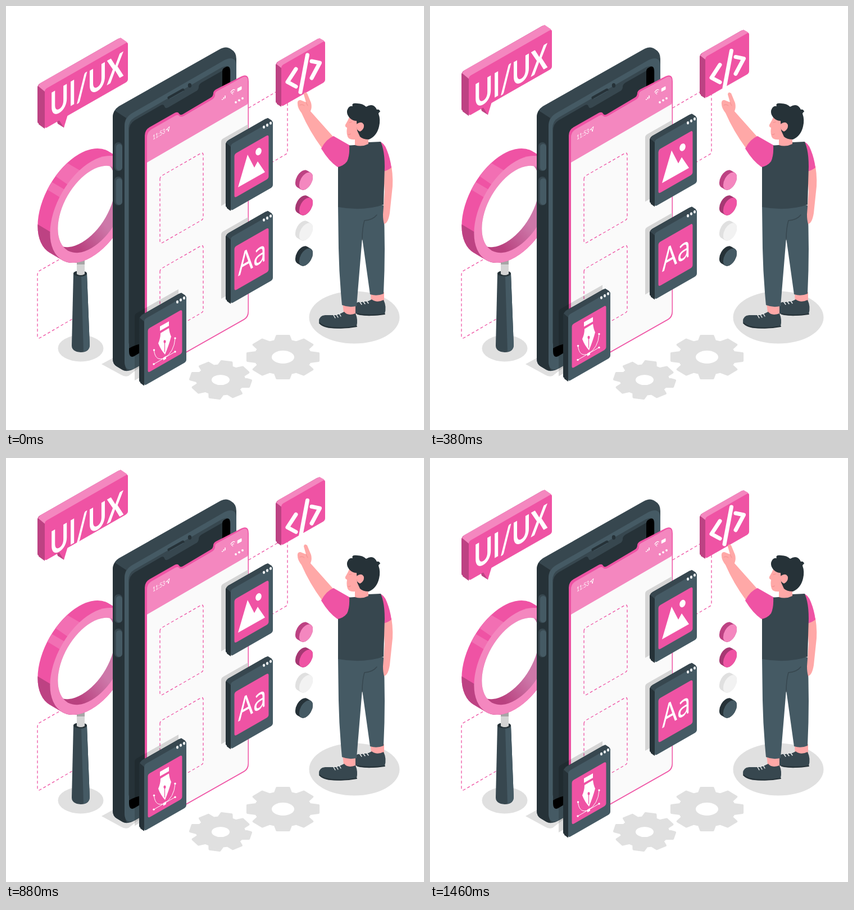
An HTML page that plays this animation: 744x753 px, repeating every 1500 ms.

```html
<!DOCTYPE html>
<html lang="en">
<head>
<meta charset="utf-8">
<title>App design</title>
<style>
  html, body { margin: 0; width: 100%; height: 100%; overflow: hidden; background: #fff; }
  svg { display: block; width: 744px; height: 753px; }
  .dash { fill: none; stroke: #ef53a4; stroke-width: 1.3; stroke-dasharray: 5 4; }
  .line { fill: none; stroke: #fff; stroke-linecap: round; stroke-linejoin: round; }
  .p { fill: #ef53a4; } .pl { fill: #f487bf; } .pd { fill: #bd4283; }
  .d1 { fill: #263238; } .d2 { fill: #37474f; } .d3 { fill: #455a64; }
  .g { fill: #e0e0e0; } .w { fill: #fff; } .skin { fill: #ffa8a7; }
  text { fill: #fff; }
</style>
</head>
<body>
<svg viewBox="0 0 744 753">
  <defs>
    <linearGradient id="wall" x1="0" y1="1" x2="1" y2="0">
      <stop offset=".2" stop-color="#b9417f"/><stop offset=".5" stop-color="#cd78a9"/>
    </linearGradient>
    <clipPath id="hole"><circle r="69" transform="matrix(.866 -.5 0 1 152 361)"/></clipPath>
    <clipPath id="rim"></clipPath>
    <clipPath id="onSheet"><path d="M248 100H431V700H248Z"/></clipPath>
    <g id="card"></g>
    <path id="cardShade" d="M383 241Q383 237 387 235L461 193V310L383 355Z"/>
  </defs>

  <g id="floor" class="g">
    <ellipse cx="620" cy="553" rx="80.500" ry="46.500"/>
    <ellipse cx="133" cy="608" rx="40.500" ry="23.500"/>
    <path d="M170 636L192 624L240 640L218 657Q211 659 205 655Z"/>
  </g>

  <!-- guides -->
  <path class="dash" d="M102 446L60 470Q56 473 56 477V586Q56 592 61 589L118 556"/>
  <path class="dash" d="M432 181L497 143Q501 141 501 146V257Q501 262 497 264L440 297"/>

  <!-- magnifier -->
  <g>
    <path class="d2" d="M120 475Q132 467 144 475L149 603Q148 615 133 615Q117 614 117 603Z"/>
    <path class="d3" d="M134 481Q143 480 144 475L149 603Q148 613 138 614Z"/>
    <ellipse class="d1" cx="132" cy="475" rx="12" ry="5"/>
    <path fill="#a6a6a6" d="M126 452H140V476Q133 480 126 476Z"/>
    <path fill="#d4d4d4" d="M126 459H140V476Q133 480 126 476Z"/>
    <g clip-path="url(#rim)">
      <path class="p" d="M50 245H230V460H50Z"/>
      <path class="pd" d="M50 384L82 403L140 470H50Z"/>
      <path fill="#f26fb3" d="M85 300L104 276L135 294L114 320ZM70 324L77 310L106 327L98 341Z"/>
    </g>
    <circle class="pl" r="85" transform="matrix(.866 -.5 0 1 152 361)"/>
    <g clip-path="url(#hole)">
      <path fill="url(#wall)" d="M88 275H220V445H88Z"/>
      <circle class="w" r="69" transform="matrix(.866 -.5 0 1 135 351)"/>
    </g>
  </g>

  <!-- phone -->
  <path class="d2" d="M190 626V198Q190 185 201 178L380 77Q392 70 401 77Q410 82 410 94V540L232 642Q216 652 207 646L197 640Q190 636 190 626Z"/>
  <path class="d1" d="M190 626V198Q190 191 194 186L214 199Q211 205 211 213V630Q211 640 215 647Q211 648 207 646L197 640Q190 636 190 626Z"/>
  <path class="d3" d="M211 630V214Q211 198 225 190L389 96Q410 86 410 108V540L232 642Q211 653 211 630Z"/>
  <path class="d2" d="M218 600V218Q218 204 229 198L384 109Q400 101 400 118V300Z"/>
  <path fill="#000" d="M219 613V560H300V578L228 622Q219 626 219 613ZM385 180V116Q385 111 390 109Q399 104 399 116V180Z"/>
  <path class="d1" d="M219 606V222Q219 209 229 203L276 176Q281 174 282 178Q283 183 289 180L337 152Q343 149 343 144Q343 139 348 136L385 115V300L260 594L232 602Q226 604 219 608Z"/>
  <g class="line">
    <path stroke="#263238" stroke-width="5" d="M290 163L315 149"/>
    <path stroke="#455a64" stroke-width="1" d="M291 165L316 151"/>
  </g>
  <ellipse class="d1" cx="327" cy="141" rx="3.200" ry="4"/>
  <g id="keys"></g>

  <!-- screen sheet -->
  <path class="p" d="M247 640V230Q247 220 256 215L300 190Q306 187 308 191Q310 195 315 192L364 163Q369 160 369 155Q369 151 374 148L419 125Q432 119 432 134V543Q432 553 424 557.500L262 649Z"/>
  <path fill="#fafafa" d="M251 640V276L430.500 172V543Q430 552 423 556L262 647Z"/>
  <path class="pl" d="M251 278V233Q251 224 259 219L301 195Q306 192 308 195Q311 198 317 195L367 166Q372 163 372 157Q372 153 376 151L420 127Q430.500 122 430.500 134V174Z"/>
  <text transform="matrix(.75 -.43 0 1 261 238)" font-family="Lato, sans-serif" font-size="11.500">11:53</text>
  <path class="line" stroke-width="1" d="M285 220L291 214L289 223L288 219Z"/>
  <g class="line">
    <path stroke-width="1.500" stroke-linecap="butt" d="M385 167V165M387.500 165.500V162M390 164V159"/>
    <path stroke-width="1.300" d="M400 153Q404 147 407 149M401.500 155Q404 152 405.500 152.500M403.500 156.500V156"/>
    <path stroke-width="1" fill="#fff" d="M412.500 146.500L419 143V148L412.500 151.500Z"/>
  </g>
  <g class="w"><circle cx="409" cy="171" r="1.900"/><circle cx="415" cy="167.500" r="1.900"/><circle cx="421" cy="164" r="1.900"/></g>
  <path id="slot" class="dash" d="M274 308Q274 303 278 301L346 262Q351 259 351 265V375Q351 379 347 381L279 420Q274 423 274 417Z"/>
  <use href="#slot" y="164.500"/>

  <!-- tool cards -->
  <g data-lift="1">
    <g fill="#d5d5d5" clip-path="url(#onSheet)">
      <use href="#cardShade"/><use href="#cardShade" y="165"/>
    </g>
    <use href="#cardShade" x="-154" y="310" fill-opacity=".15"/>
    <use href="#card"/>
    <path class="w" d="M413 322L430 264L442 287L448 276L461 295Z"/>
    <ellipse class="w" cx="449.500" cy="258.500" rx="5" ry="7" transform="rotate(20 449.500 258.500)"/>
    <use href="#card" y="165"/>
    <text transform="matrix(.78 -.45 0 1 413 480)" font-family="'Noto Sans', sans-serif" font-size="54">Aa</text>
    <use href="#card" x="-154" y="310.500"/>
    <path class="w" d="M274 569L290 560V568L274 577ZM275 581L290 572Q291 581 294 587Q290 602 283 619Q275 610 271 599Q275 590 275 581Z"/>
    <path class="line" style="stroke:#ef53a4" stroke-width="1.200" d="M282.500 614V597"/>
    <ellipse class="p" cx="282.500" cy="596" rx="2" ry="2.800"/>
    <path class="line" stroke-width="1" d="M263 636L301 614M263.500 612Q266 632 282 625Q299 615 301 591"/>
    <g class="w"><circle cx="263.500" cy="611" r="1.700"/><circle cx="301" cy="590" r="1.700"/><circle cx="263" cy="636" r="1.700"/><circle cx="301" cy="614" r="1.700"/><path d="M280 624.500L285 621.500V626.500L280 629.500Z"/></g>
  </g>

  <!-- label -->
  <g data-lift="3" id="bubble"></g>
  <text data-lift="2" data-at="matrix(.75 -.43 0 1 78 199)" font-family="Lato, sans-serif" font-weight="700" font-size="60">UI/UX</text>

  <!-- code block -->
  <g data-lift="2" id="code"></g>
  <g data-lift="1">
    <path class="line" stroke-width="7" stroke-linecap="butt" d="M516 112L501 135L516 143M536.500 87L524 153M544 98L558.500 101L544 128"/>
  </g>

  <g id="discs"></g>

  <!-- person -->
  <g>
    <path class="skin" d="M599 528H623V552L602 552ZM649 508H673V530L650 530Z"/>
    <path class="d2" d="M557 560Q557 550 568 549L587 549Q595 547 602 543Q608 551 622 546Q627 557 624 569Q600 574 577 572Q557 569 557 560Z"/>
    <path class="d2" d="M622 530Q624 525 632 526L645 524L651 521Q660 528 672 522Q678 534 674 547Q652 552 630 549L622 546Z"/>
    <path class="line" style="stroke:#263238" stroke-width="2" d="M558 563Q565 570 580 571Q604 573 624 569M626 547Q650 551 674 547"/>
    <path class="line" stroke-width="1.300" d="M583 549L586 554M588 548L591 553M593 546L596 551M630 526L633 530M636 525L639 529M642 524L645 528"/>
    <path class="d3" d="M591 354H672Q676 430 672 511Q660 516 648 512L634 412L624 533Q610 536 598 531Q593 480 592 430Z"/>
    <path class="line" style="stroke:#37474f" stroke-width="1.500" d="M634 415Q634 395 638 381Q653 380 660 371"/>
    <path class="skin" d="M671 285L686 284Q690 310 687 330L683 368Q680 386 673 387Q671 380 671 370L674 330Z"/>
    <path class="p" d="M664 241Q673 242 678 256Q684 271 686 287Q680 292 671 294Z"/>
    <path class="d2" d="M606 247Q621 249 645 242L667 241Q674 257 674 285L672 353Q635 365 591 357V278Z"/>
    <path class="skin" d="M562 252Q540 222 526 190Q519 181 519 174Q518 167 524 167L534 171L530 157Q531 151 536 155L543 172Q545 180 542 187L584 234Z"/>
    <path class="line" style="stroke:#f28f8f" stroke-width="1" d="M523 176Q528 174 531 177M534 171L537 177"/>
    <path class="p" d="M583 231Q597 239 611 247Q612 266 607 276Q601 284 590 286Q574 275 561 253Q570 236 583 231Z"/>
    <path class="skin" d="M613 193Q609 203 604 211Q603 215 607 216Q605 229 610 235Q615 238 621 237V247Q633 251 645 245V202Z"/>
    <path class="line" style="stroke:#f28f8f" stroke-width="1.200" d="M609 228Q612 229 613 227M611 207L615 206"/>
    <path class="d1" d="M612 199Q603 189 610 180Q613 177 617 178Q614 172 625 173Q635 173 641 179Q654 171 660 184Q665 183 666 188Q664 188 663 191Q667 202 664 214Q660 231 646 237Q635 237 630 232L625 221L624 204Q617 204 612 199Z"/>
    <path class="skin" d="M624 210Q633 203 637 211Q638 219 630 223Q623 221 624 210Z"/>
  </g>
</svg>
<script>
  const $ = id => document.getElementById(id);
  const SLOPE = 0.57;
  const poly = (pts, cls) => `<path class="${cls}" d="M${pts.map(p => p.join(' ')).join('L')}Z"/>`;

  // Sheared panel with softly rounded corners
  function panel(x, y, w, h, cls, r = 4) {
    const k = w * SLOPE, q = r * SLOPE;
    return `<path class="${cls}" d="M${x} ${y + r}Q${x} ${y} ${x + r} ${y - q}L${x + w - r} ${y - k + q}` +
      `Q${x + w} ${y - k} ${x + w} ${y - k + r}V${y - k + h - r}Q${x + w} ${y - k + h} ${x + w - r} ${y - k + h + q}` +
      `L${x + r} ${y + h - q}Q${x} ${y + h} ${x} ${y + h - r}Z"/>`;
  }

  function slab(x, y, w, h, dx, dy, [front, side, top]) {
    const k = w * SLOPE;
    return panel(x - dx, y - dy, w, h, side, 5) +
      poly([[x - dx, y - dy + 3], [x, y], [x, y + h], [x - dx + 2, y + h - dy]], side) +
      poly([[x - dx + 1, y - dy + 2], [x - dx + 5, y - dy - 3], [x - dx + w - 5, y - dy - k + 3],
        [x - dx + w, y - dy - k + .5], [x + w - 2, y - k], [x + w, y - k + 5], [x, y + 4]], top) +
      panel(x, y, w, h, front);
  }

  const pinks = ['p', 'pd', 'pl'];
  const dot = (x, y) => `<ellipse class="w" cx="${x}" cy="${y}" rx="2" ry="2.700"/>`;
  $('card').innerHTML = slab(400, 246, 75, 118, 9, 5, ['d3', 'd1', 'd2']) +
    panel(406.5, 263, 61, 78, 'p') + dot(459, 215) + dot(465, 211.5) + dot(471, 208);
  $('bubble').innerHTML = poly([[90, 202], [92, 209], [103, 216], [105, 195]], 'pd') +
    slab(69, 148, 148, 70, 13, 8, pinks) + poly([[94, 202], [103, 216], [110, 193]], 'p');
  $('code').innerHTML = slab(490, 106, 78, 73, 10, 5, pinks);

  // Upright circle swept along the depth axis
  const round = (x, y, r) => `<circle r="${r}" transform="matrix(.866 -.5 0 1 ${x} ${y})"/>`;
  function sweep(x, y, r, depth) {
    let s = '';
    for (let i = 0; i <= depth; i++) s += round(x + i, y + i * .59, r);
    return s;
  }
  $('rim').innerHTML = sweep(130, 348, 85, 22);

  const tones = [['#f487bf', '#bd4283'], ['#ef53a4', '#a63873'], ['#f2f2f2', '#e0e0e0'], ['#455a64', '#263238']];
  $('discs').innerHTML = tones.map(([face, edge], i) =>
    `<g fill="${edge}">${sweep(527, 307 + i * 45, 14, 7)}</g>` +
    `<g fill="${face}">${round(534, 311 + i * 45, 14)}</g>`).join('');

  $('keys').innerHTML = [242, 303].map(y =>
    `<rect class="d2" x="193" y="${y}" width="14" height="51" rx="6.500"/>` +
    `<rect class="d3" x="196" y="${y + 3}" width="11" height="47" rx="5.500"/>`).join('');

  function gear(cx, cy, rx, ry, hole, turn) {
    const pts = [], steps = [[-.29, .78], [-.17, 1], [.17, 1], [.29, .78]];
    for (let i = 0; i < 8; i++) for (const [da, r] of steps) {
      const a = i * Math.PI / 4 + turn + da;
      pts.push([(cx + rx * r * Math.cos(a)).toFixed(1), (cy + ry * r * Math.sin(a)).toFixed(1)]);
    }
    return `<g stroke="#e0e0e0" stroke-width="4" stroke-linejoin="round">${poly(pts, 'g')}</g>` +
      `<ellipse class="w" cx="${cx}" cy="${cy}" rx="${hole}" ry="${hole * .57}"/>`;
  }
  $('floor').innerHTML += gear(382, 664, 54, 33, 16, .2) + gear(493, 623.5, 64, 38, 20, 0);

  // Floating: a linear rise and fall, held at 24 pictures per second
  const LOOP = 1500, UNIT = 14.7;
  const parts = [...document.querySelectorAll('[data-lift]')];
  const start = performance.now();

  function draw(now) {
    const t = Math.max(0, now - start) % LOOP;
    const step = Math.ceil((Math.floor(t / 10) + 1) * 24 / 100) - 1;
    const rise = 1 - Math.abs(step / 17.5 - 1);
    for (const el of parts) {
      const y = -UNIT * el.dataset.lift * rise;
      el.setAttribute('transform', `translate(0 ${y.toFixed(2)}) ${el.dataset.at || ''}`);
    }
    requestAnimationFrame(draw);
  }
  draw(start);
</script>
</body>
</html>
```
